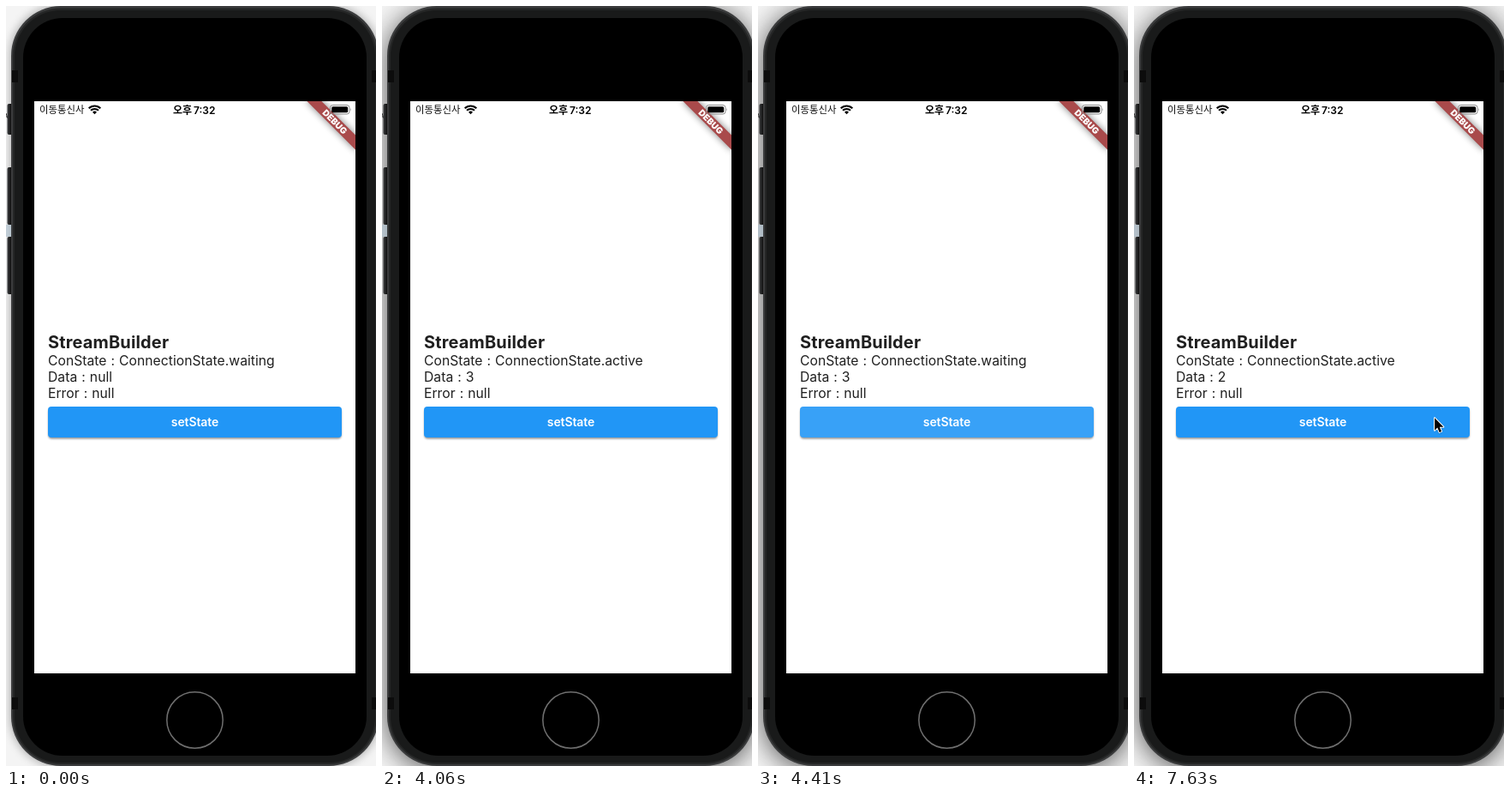
Recreate the animation shown at these times as an HTML page. Size 432 by 886 pixels, loop 8 s.

```html
<!DOCTYPE html>
<html lang="ko">
<head>
<meta charset="utf-8">
<title>StreamBuilder demo</title>
<style>
  html, body { margin: 0; width: 100%; height: 100%; overflow: hidden; background: #f4f4f4; }
  svg { display: block; }
  text { font-family: Inter, "Noto Sans CJK KR", "Noto Sans CJK", sans-serif; fill: #1f1f1f; }
  .line { font-size: 15.7px; letter-spacing: .02px; word-spacing: .6px; white-space: pre; }
  .title { font-size: 20px; font-weight: 700; letter-spacing: .15px; }
  .label { font-size: 14px; font-weight: 600; letter-spacing: -.1px; fill: #fff; text-anchor: middle; }
  .hangul { font-family: "Noto Sans CJK KR", "Noto Sans CJK", sans-serif; fill: #111; }
  .clock { font-size: 12px; font-weight: 600; fill: #000; }
  .debug { font-size: 10.2px; font-weight: 900; fill: #fff; text-anchor: middle; }
</style>
</head>
<body>
<svg width="432" height="886" viewBox="0 0 432 886">
  <defs>
    <filter id="soft" x="-20%" y="-20%" width="140%" height="140%"><feGaussianBlur stdDeviation="6"/></filter>
    <filter id="wide" x="-20%" y="-20%" width="140%" height="140%"><feGaussianBlur stdDeviation="16"/></filter>
    <filter id="ribbonBlur" x="-30%" y="-200%" width="160%" height="500%"><feGaussianBlur stdDeviation="4"/></filter>
    <filter id="lift" x="-5%" y="-30%" width="110%" height="170%"><feGaussianBlur stdDeviation="1.3"/></filter>
    <filter id="arrowBlur" x="-50%" y="-50%" width="200%" height="200%"><feGaussianBlur stdDeviation=".9"/></filter>
    <linearGradient id="key"><stop offset="0" stop-color="#3c3e40"/><stop offset=".5" stop-color="#141414"/><stop offset="1" stop-color="#1c1c1c"/></linearGradient>
    <clipPath id="screen"><rect x="33" y="111" width="375" height="667"/></clipPath>
    <path id="arrow" d="M0 0V14.4L3.3 11.3L5.6 16.6L8 15.6L5.8 10.4H10.3Z"/>
  </defs>

  <!-- desktop and window shadow -->
  <rect width="432" height="886" fill="#f4f4f4"/>
  <rect id="idle" x="6" y="0" width="429" height="886" rx="58" opacity=".35" filter="url(#soft)"/>
  <rect id="focus" x="6" y="4" width="429" height="886" rx="58" opacity=".65" filter="url(#wide)"/>
  <rect x="0" y="255" width="6" height="14" fill="#b3c4d0" opacity=".7"/>
  <path d="M0 125L2 131M0 129H2" stroke="#333" fill="none"/>

  <!-- phone -->
  <g fill="url(#key)">
    <rect x="1.5" y="114" width="8" height="36" rx="2"/>
    <rect x="1.5" y="188" width="8" height="67" rx="2"/>
    <rect x="1.5" y="269" width="8" height="67" rx="2"/>
  </g>
  <rect x="6" y="0" width="429" height="886" rx="58" fill="#3b3c3d"/>
  <rect x="8" y="2.5" width="425" height="881.5" rx="56" fill="#252626"/>
  <rect x="10" y="5" width="421" height="877" rx="54" fill="#191a1a"/>
  <g fill="#0c0c0c">
    <rect x="7" y="75" width="7" height="14"/><rect x="427" y="75" width="5" height="14"/>
    <rect x="7" y="806" width="7" height="14"/><rect x="427" y="806" width="5" height="14"/>
  </g>
  <rect x="20" y="14" width="401" height="860" rx="46"/>
  <circle cx="220.5" cy="832.5" r="32.7" fill="none" stroke="#6f6f6f" stroke-width="1.5"/>
  <rect x="33" y="111" width="375" height="667" fill="#fff"/>

  <!-- app -->
  <text class="title" x="49" y="399">StreamBuilder</text>
  <text class="line" x="49" y="419.3">ConState : ConnectionState.<tspan id="state">waiting</tspan></text>
  <text class="line" x="49" y="438.3">Data : <tspan id="data">null</tspan></text>
  <text class="line" x="49" y="457.3">Error : null</text>
  <rect x="49.5" y="469" width="342" height="35.5" rx="4" opacity=".45" filter="url(#lift)"/>
  <rect x="49" y="467" width="343" height="36" rx="4" fill="#2196f6"/>
  <rect id="ink" x="49" y="467" width="343" height="36" rx="4" fill="#fff" opacity="0"/>
  <text class="label" x="220.5" y="490">setState</text>

  <!-- debug ribbon -->
  <g clip-path="url(#screen)">
    <g transform="translate(408 111) rotate(45)">
      <rect x="-40" y="28" width="80" height="12" opacity=".5" filter="url(#ribbonBlur)"/>
      <rect x="-42" y="28" width="84" height="12" fill="#a94a4b"/>
      <text class="debug" x="0" y="37.7">DEBUG</text>
    </g>
  </g>

  <!-- status bar -->
  <text class="hangul" x="39" y="125.3" font-size="11.4">이동통신사</text>
  <g fill="none" stroke="#000" stroke-width="2.1">
    <path d="M96.7 119.3A9.6 9.6 0 0 1 110.3 119.3"/>
    <path d="M99 121.8A6.4 6.4 0 0 1 108 121.8"/>
    <path d="M103.5 126.2L101 123.7A3.6 3.6 0 0 1 106 123.7Z" fill="#000" stroke="none"/>
  </g>
  <text class="clock hangul" x="195" y="125.5">오후</text>
  <text class="clock" x="219" y="125.5">7:32</text>
  <rect x="378.5" y="115.5" width="22.5" height="10.5" rx="3" fill="none" stroke="#8d8d8d"/>
  <rect x="380.3" y="117.2" width="18.9" height="7.1" rx="1.6"/>
  <path d="M402.2 119V122.6Q403.6 120.8 402.2 119Z" fill="#8d8d8d"/>

  <g id="cursor">
    <use href="#arrow" y="1" opacity=".4" filter="url(#arrowBlur)"/>
    <use href="#arrow" fill="#000" stroke="#fff" stroke-width="2" stroke-linejoin="round" paint-order="stroke"/>
  </g>
</svg>
<script>
  const LOOP = 8000;
  // Each track lists [start in ms, value]; values hold until the next start.
  const tracks = {
    state: [[0, "waiting"], [140, "active"], [4200, "waiting"], [5180, "active"]],
    data: [[0, "null"], [140, "0"], [1190, "1"], [2240, "2"], [3290, "3"],
           [5180, "0"], [6230, "1"], [7280, "2"]],
    ink: [[0, 0], [4130, .06], [4200, .16], [4270, .22], [4340, .2], [4410, .1], [4480, 0]],
    focused: [[0, false], [4060, true]],
    cursor: [[0, null], [5460, "350.5 512.8"], [5810, null], [7630, "351 480.3"]]
  };
  const el = id => document.getElementById(id);
  const at = (name, t) => tracks[name].findLast(([start]) => start <= t)[1];
  const show = (id, on) => el(id).setAttribute("visibility", on ? "visible" : "hidden");
  const setText = (id, value) => {
    if (el(id).textContent !== value) el(id).textContent = value;
  };

  function draw(now) {
    const t = now % LOOP;
    setText("state", at("state", t));
    setText("data", at("data", t));
    el("ink").setAttribute("opacity", at("ink", t));
    const focused = at("focused", t);
    show("focus", focused);
    show("idle", !focused);
    const spot = at("cursor", t);
    show("cursor", spot);
    if (spot) el("cursor").setAttribute("transform", `translate(${spot})`);
  }

  const begin = performance.now();
  function tick() {
    draw(performance.now() - begin);
    requestAnimationFrame(tick);
  }
  tick();
</script>
</body>
</html>
```
